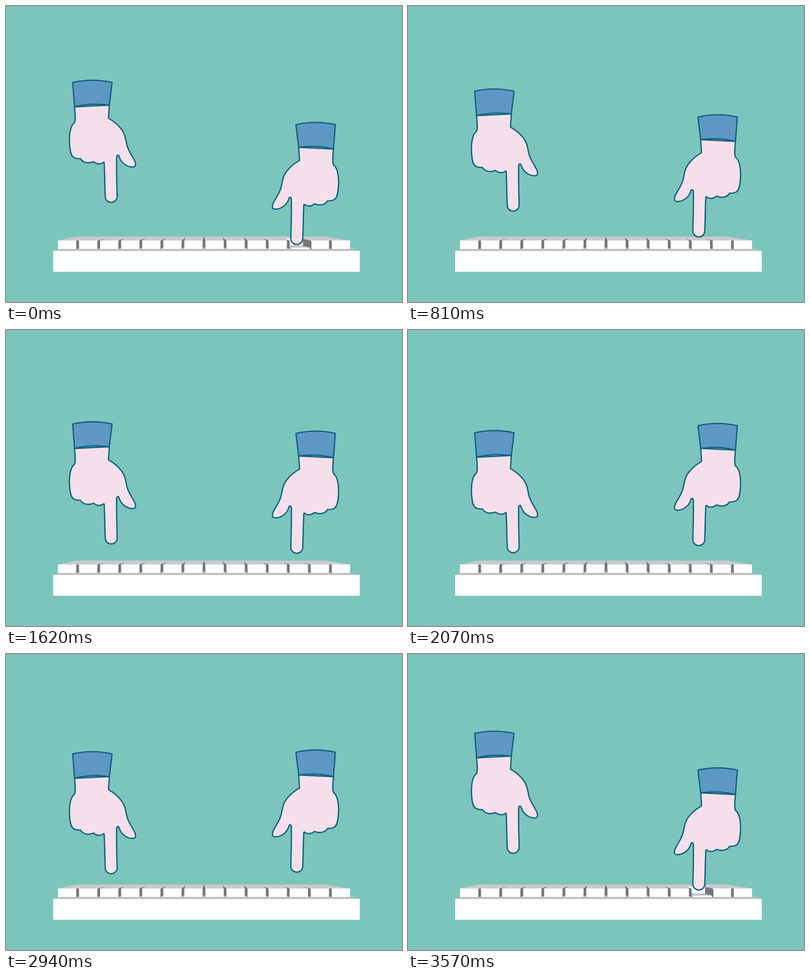
Recreate the animation shown at these times as an HTML page. Size 800 px wide and 600 px high, loop 3600 ms.

```html
<!DOCTYPE html>
<html lang="en">
<head>
<meta charset="utf-8">
<title>Typing hands</title>
<style>
  html, body { margin: 0; width: 100%; height: 100%; overflow: hidden; background: #7bc5bd; }
  svg { display: block; width: 800px; height: 600px; }
  .white { fill: #fdfeff; }
  .top { fill: #cbcacc; }
  .ledge { fill: #bdbbbe; }
  .dark { fill: #75767b; }
  .line { stroke: #0e6080; stroke-width: 2.6; stroke-linejoin: round; }
</style>
</head>
<body>
<svg viewBox="0 0 800 600">
  <defs>
    <g id="hand" class="line">
      <path fill="#f5dfeb" d="M138.5 204.5 C139.5 217 141.5 232 138 237 C128 244 127 270 129 286
        C130 298 132 304 137 307 C141 309.5 146 309.5 150.5 309.5 C155 317.5 166 320 177 315.5
        C182 320.5 191 321.5 196 317.5 Q198 315.5 198.3 318 C199.5 340 199.5 362 200.5 386
        A12 12 0 0 0 224.5 386 C224 360 223 335 223.5 306 C224 301 228 301 229 306
        C232 317 244 327 257 326.3 C263 326 263 319 259 312 C254 302 247 294 244 281
        C241 265 239 255 229 245 C222 237 213 231 207 227.5 L208.7 201 Z"/>
      <path fill="#5f98c4" d="M134.7 155 Q174 146 214.3 155 L208.7 201 Q172 196 138.5 204.5 Z"/>
    </g>
  </defs>

  <path class="ledge" d="M105 492 H695 L714.5 497 H95.5 Z"/>
  <rect class="white" x="95.3" y="496.4" width="619.4" height="42.4" rx="1"/>
  <path class="top" d="M105 475.5 L141 467.4 H645 L695 475.5 Z"/>
  <rect class="white" x="105" y="475.3" width="590" height="17.2"/>
  <g id="gaps"></g>

  <g id="keyL">
    <path class="white" d="M200 472 H229 L227 475.5 V486 H200 Z"/>
    <path class="ledge" d="M190 475.5 L200 472 V486 L190 490 Z"/>
    <path class="top" d="M200 485.7 H227 V490 H190 Z"/>
    <path class="white" d="M190 489.7 H227 V492.8 H190 Z"/>
  </g>
  <g id="keyR">
    <path class="white" d="M562 471.5 H600 V486 H573 V475.5 Z"/>
    <path class="ledge" d="M573 485.5 H600 L615 489.8 V492.5 H573 Z"/>
    <path class="dark" d="M600 472 L617 477 V492.5 H614 V489.8 L600 486 Z"/>
    <path class="white" d="M576.5 489.5 H613.5 V493 H576.5 Z"/>
  </g>

  <use id="left" href="#hand"/>
  <use id="right" href="#hand"/>
</svg>
<script>
const $ = id => document.getElementById(id);
const STEP = 30, CYCLE = 900, HALF = CYCLE / 2;

// Peaks of the dark wedges between keys
const peaks = [[203, 471.5], [240, 471], [283, 470.5], [326, 469.5], [363, 469], [399.7, 467.2],
  [437, 469], [481, 469], [518, 471], [560, 472], [597, 471.5]];

let gaps = '';
for (let i = 0; i < 13; i++) {
  const a = 142 + i * 42.55, b = a + 5.5;
  const cut = 492.5 - Math.max(0.5, 5 - 0.8 * Math.abs(i - 6));
  const peak = peaks[i - 1] || [a + 2.7, 475.3];
  const foot = i < 6 ? `${b} ${cut} ${a} 492.5`
    : i > 6 ? `${b} 492.5 ${a} ${cut}`
    : `${b} 492.5 ${a + 2.7} ${cut} ${a} 492.5`;
  gaps += `<path class="ledge" d="M${a} 485H${b}V492.5H${a}Z"/>` +
    `<polygon class="dark" points="${a} 475.3 ${peak} ${b} 475.3 ${foot}"/>`;
}
$('gaps').innerHTML = gaps;

function draw() {
  const t = Math.floor(performance.now() / STEP) * STEP % CYCLE;
  const down = 1 - Math.abs(t - HALF) / HALF;
  $('left').setAttribute('transform', `translate(0 ${89 * down})`);
  $('right').setAttribute('transform', `translate(800 ${85.5 - 77.5 * down}) scale(-1 1)`);
  $('keyL').style.display = down > 0.83 ? '' : 'none';
  $('keyR').style.display = down < 0.17 ? '' : 'none';
  requestAnimationFrame(draw);
}
draw();
</script>
</body>
</html>
```
